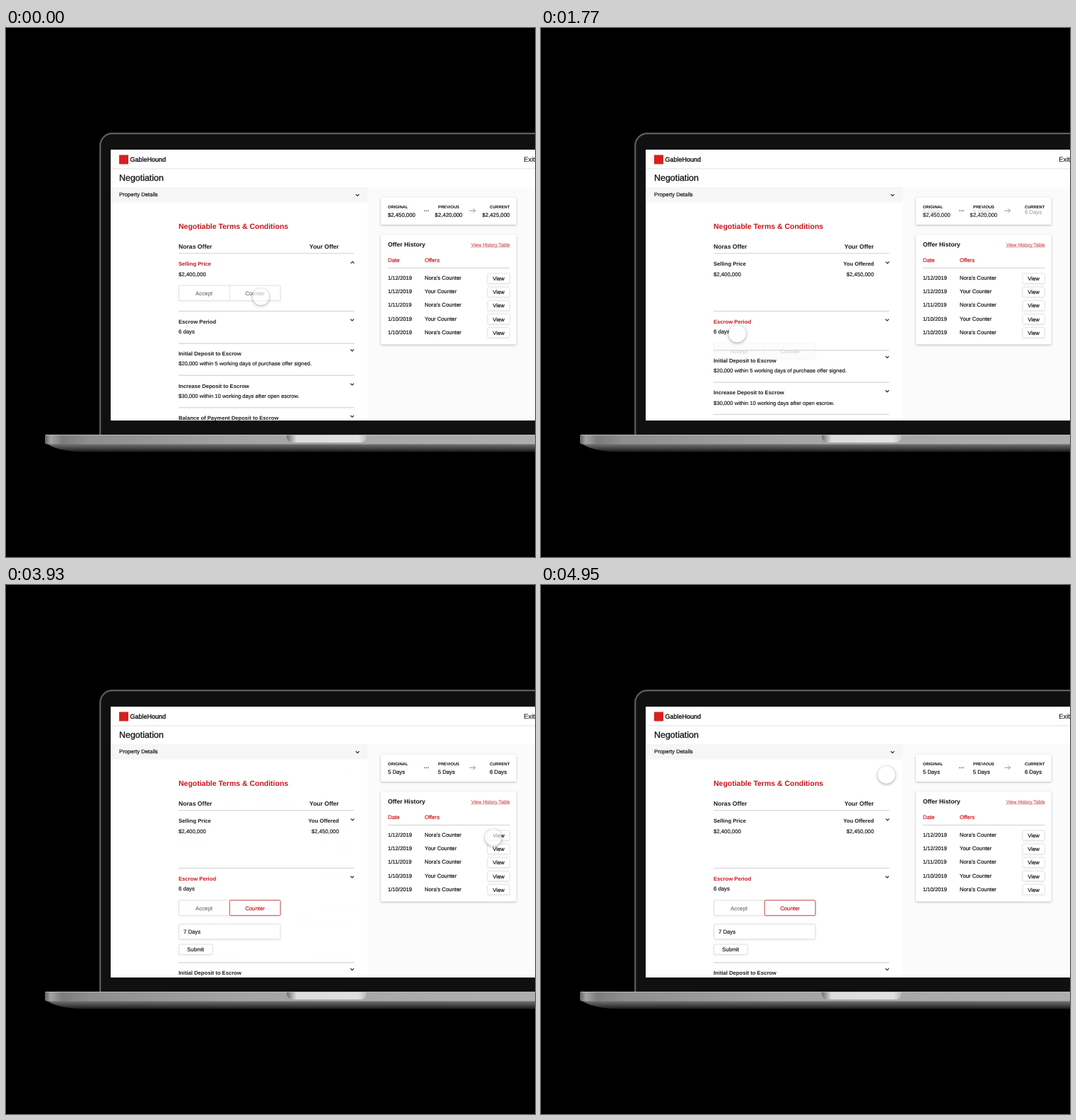
Animation of 748x748 px, one loop 4.98 s. Source, as an HTML page with a canvas:

```html
<!DOCTYPE html>
<html lang="en">
<head>
<meta charset="utf-8">
<title>Negotiation</title>
<style>
html, body { margin: 0; width: 100%; height: 100%; overflow: hidden; background: #000; }
canvas { display: block; width: 748px; height: 748px; }
</style>
</head>
<body>
<canvas id="stage"></canvas>
<script>
const SIZE = 748, LOOP = 4980;
const RED = '#c8141c', INK = '#1c1c1c', GREY = '#7a7a7a', RULE = '#dedede';
const canvas = document.getElementById('stage');
const ctx = canvas.getContext('2d');
const dpr = window.devicePixelRatio || 1;
canvas.width = canvas.height = SIZE * dpr;
ctx.scale(dpr, dpr);
ctx.textRendering = 'geometricPrecision';

const clamp = v => Math.max(0, Math.min(1, v));
const ease = (t, from, to) => {
  const u = clamp((t - from) / (to - from));
  return u * u * (3 - 2 * u);
};
const mix = (a, b, u) => a + (b - a) * u;

function fade(alpha, draw) {
  if (alpha <= 0) return;
  ctx.save();
  ctx.globalAlpha *= alpha;
  draw();
  ctx.restore();
}

// y is the middle of the capital letters; grow thickens the strokes a little
function text(s, x, y, { size = 7.65, color = INK, bold = false, align = 'left', grow = 0.18 } = {}) {
  ctx.font = `${bold ? 'bold ' : ''}${size}px "Liberation Sans", Arial, sans-serif`;
  ctx.textAlign = align;
  ctx.fillStyle = ctx.strokeStyle = color;
  ctx.fillText(s, x, y + size * 0.36);
  if (bold) return;
  ctx.lineWidth = grow;
  ctx.strokeText(s, x, y + size * 0.36);
}
const bold = (s, x, y, o) => text(s, x, y, { bold: true, ...o });

function rect(x, y, w, h, color) {
  ctx.fillStyle = color;
  ctx.fillRect(x, y, w, h);
}

function rule(y, x1 = 244, x2 = 492.5, h = 1.6, color = RULE) {
  rect(x1, y - h / 2, x2 - x1, h, color);
}

function path(points, color, width) {
  ctx.beginPath();
  points.forEach(([x, y], i) => i ? ctx.lineTo(x, y) : ctx.moveTo(x, y));
  ctx.strokeStyle = color;
  ctx.lineWidth = width;
  ctx.stroke();
}

function chevron(x, y, dir = 1) {
  path([[x - 2.4, y - 1.2 * dir], [x, y + 1.2 * dir], [x + 2.4, y - 1.2 * dir]], '#222', 1.2);
}

function box(x, y, w, h, stroke, shadow) {
  ctx.save();
  ctx.beginPath();
  ctx.roundRect(x, y, w, h, 1.5);
  ctx.fillStyle = '#fff';
  if (shadow) {
    ctx.shadowColor = `rgba(0,0,0,${shadow})`;
    ctx.shadowBlur = 3 * dpr;
    ctx.shadowOffsetY = dpr;
  }
  ctx.fill();
  ctx.shadowColor = 'transparent';
  if (stroke) {
    ctx.strokeStyle = stroke;
    ctx.lineWidth = 1;
    ctx.stroke();
  }
  ctx.restore();
}

function gradient(x1, y1, x2, y2, stops) {
  const g = ctx.createLinearGradient(x1, y1, x2, y2);
  stops.forEach(([p, c]) => g.addColorStop(p, c));
  return g;
}

function laptop() {
  rect(0, 0, SIZE, SIZE, '#000');
  ctx.save();
  ctx.beginPath();
  ctx.rect(0, 0, SIZE, 575);
  ctx.clip();
  ctx.beginPath();
  ctx.roundRect(133.2, 149.2, 700, 500, 17);
  ctx.fillStyle = '#101010';
  ctx.fill();
  ctx.strokeStyle = '#5e5e60';
  ctx.lineWidth = 2.2;
  ctx.stroke();
  ctx.restore();

  // base: underside, then the lit front edge
  ctx.beginPath();
  ctx.moveTo(55, 586);
  ctx.bezierCurveTo(66, 594, 82, 599, 108, 599.5);
  ctx.lineTo(SIZE, 599.5);
  ctx.lineTo(SIZE, 586);
  ctx.fillStyle = gradient(0, 587, 0, 600, [[0, '#7c7c7c'], [0.45, '#505050'], [1, '#141414']]);
  ctx.fill();
  ctx.beginPath();
  ctx.roundRect(55, 575, 700, 13.5, [2, 0, 0, 3]);
  ctx.fillStyle = gradient(55, 0, SIZE, 0, [[0, '#606060'], [0.012, '#a4a4a4'], [0.035, '#7c7c7c'],
    [0.09, '#8e8e8e'], [0.4, '#a4a4a4'], [1, '#aeaeae']]);
  ctx.fill();
  rect(56, 575, 692, 1, '#b8b8b8');
  ctx.beginPath();
  ctx.roundRect(397, 575.8, 112.5, 10.2, [0, 0, 8, 8]);
  ctx.fillStyle = gradient(397, 0, 509.5, 0, [[0, '#707070'], [0.12, '#dcdcdc'], [0.9, '#e0e0e0'],
    [1, '#bbb']]);
  ctx.fill();
}

function chrome() {
  rect(148, 172, 600, 383, '#fff');
  rect(511, 225, 237, 330, '#fbfbfb');
  rect(148, 225, 363, 21.5, '#f6f6f6');
  rule(199, 148, 748, 1, '#e2e2e2');
  rect(160, 179.5, 13, 13, '#d8201c');
  text('GableHound', 175.5, 186, { size: 9, color: '#111', grow: 0.35 });
  text('Exit', 732.3, 185.3, { size: 9.4 });
  text('Negotiation', 160, 211.7, { size: 12.45, color: '#111', grow: 0.3 });
  text('Property Details', 160, 235.7, { size: 7.7, color: '#111' });
  chevron(497, 236.3);
}

// heading, its x and alignment, then old and new value with the new value's x
const COLUMNS = [
  ['ORIGINAL', 540, 'left', '$2,450,000', '5 Days', 540],
  ['PREVIOUS', 626, 'center', '$2,420,000', '5 Days', 622.8],
  ['CURRENT', 712.3, 'right', '$2,425,000', '6 Days', 708]
];

function summary(t) {
  box(530, 239.5, 191.5, 38.5, null, 0.26);
  COLUMNS.forEach(([head, x, align, before, after, x2], i) => {
    const last = i === 2;
    const value = { size: 7.75, align, color: '#111' };
    const start = last ? 1690 : 1720;
    const come = ease(t, start, start + 220);
    const gone = last ? ease(t, 1590, 1740) : come;
    bold(head, x, 252.8, { size: 5.8, align, color: '#111' });
    fade(1 - gone, () => text(before, x, 264 + 3 * gone, value));
    fade(come, () => text(after, x2, 264 - 5 * (1 - come), value));
  });
  for (let i = 0; i < 3; i++) rect(591 + i * 2.7, 257.5, 1.7, 1.7, '#888');
  path([[655.5, 258.3], [663.5, 258.3]], '#888', 0.9);
  path([[660.5, 255.3], [663.6, 258.3], [660.5, 261.3]], '#888', 0.9);
}

function history() {
  box(530, 292, 191.5, 155.5, null, 0.26);
  bold('Offer History', 540, 305.5, { size: 8.67, color: '#111' });
  text('View History Table', 712.5, 306.7, { size: 6.67, color: '#cc6064', align: 'right' });
  rule(309.9, 657, 712.5, 0.6, '#cc6064');
  text('Date', 540, 328, { size: 7.8, color: RED });
  text('Offers', 592, 328, { size: 7.8, color: RED });
  rule(339.5, 540, 712.3);
  ['1/12/2019', '1/12/2019', '1/11/2019', '1/10/2019', '1/10/2019'].forEach((date, i) => {
    const y = 353.3 + i * 19.15;
    text(date, 540, y, { color: '#111' });
    text(i % 2 ? 'Your Counter' : 'Nora\u2019s Counter', 592, y, { size: 7.73, color: '#111' });
    box(681, y - 6.3, 31, 14.2, '#e4e4e4', 0.1);
    text('View', 696.5, y + 1, { align: 'center', size: 7.7, color: '#111' });
  });
}

// Accept / Counter pair with the field that opens below it
function controls(y, chosen, open, value) {
  box(244.5, y, 143.5, 21.5, '#e0e0e0', 0.08);
  rect(315.7, y, 1, 21.5, '#e0e0e0');
  text('Accept', 280, y + 11, { size: 7.8, color: GREY, align: 'center' });
  text('Counter', 352, y + 11, { size: 7.8, color: GREY, align: 'center' });
  fade(chosen, () => {
    box(316.2, y, 71.8, 21.5, '#c9444a');
    text('Counter', 352, y + 11, { size: 7.8, color: RED, align: 'center' });
  });
  fade(open, () => {
    box(244.5, y + 33.7, 143.3, 21.3, '#e0e0e0', 0.1);
    text(value, 251, y + 44.4, { size: 7.75 });
    box(244.5, y + 62.2, 47.5, 14.3, '#e0e0e0', 0.1);
    text('Submit', 268, y + 69.4, { size: 7.7, align: 'center' });
  });
}

function typed(s, t, from, step) {
  return s.slice(0, Math.max(0, Math.floor((t - from) / step)));
}

function titled(name, x, y, redness) {
  fade(1 - redness, () => bold(name, x, y));
  fade(redness, () => bold(name, x, y, { color: RED }));
}

function terms(t) {
  bold('Negotiable Terms & Conditions', 244, 280, { size: 10.48, color: RED });
  bold('Noras Offer', 244, 308.7, { size: 8.65 });
  bold('Your Offer', 470.7, 308.7, { size: 8.55, align: 'right' });
  rule(318.7, 244, 492.5, 1, '#d0d0d0');

  const done = ease(t, 1480, 1680);
  const open1 = ease(t, 180, 420) * (1 - done);
  const show = ease(t, 1690, 1930);
  const open2 = ease(t, 2320, 2570);

  titled('Selling Price', 244, 333.6, 1 - done);
  text('$2,400,000', 244, 348, { size: 7.75 });
  chevron(490, 331.6, done < 0.5 ? -1 : 1);
  fade(1 - done, () => controls(364, ease(t, 130, 280), open1, typed('$ 2,450,000', t, 760, 30)));
  fade(done, () => {
    bold('You Offered', 470.7, 333.6, { align: 'right' });
    text('$2,450,000', 470.7, 348, { size: 7.75, align: 'right' });
  });

  let y = 51.3 * open1;
  rule(400.5 + y);
  titled('Escrow Period', 244, 415 + y, done);
  text('6 days', 244, 429.7 + y, { size: 7.75 });
  chevron(489.5, 412.8 + y);
  fade(show, () =>
    controls(445.8, ease(t, 2270, 2420), open2, typed('7 Days', t, 3050, 55)));

  y += 36.5 * show + 51.3 * open2;
  rule(446 + y);
  bold('Initial Deposit to Escrow', 244, 460.4 + y);
  text('$20,000 within 5 working days of purchase offer signed.', 244, 474.7 + y, { size: 7.63 });
  chevron(489.5, 455.6 + y);
  rule(491.2 + y);
  bold('Increase Deposit to Escrow', 244, 506 + y);
  text('$30,000 within 10 working days after open escrow.', 244, 520.3 + y, { size: 7.63 });
  chevron(489.5, 503.8 + y);
  rule(536.7 + y);
  bold('Balance of Payment Deposit to Escrow', 244, 551.2 + y);
  chevron(489.5, 549 + y);
}

function pair(y, head, lines, rightHead, rightLines, lift = 0) {
  bold(head, 244, y);
  bold(rightHead, 492.3, y - lift, { align: 'right' });
  lines.forEach((s, i) => text(s, 244, y + 14.4 + i * 9.2));
  rightLines.forEach((s, i) => text(s, 492.3, y + 14.4 - lift + i * 9.2, { align: 'right' }));
}

function pastOffer() {
  rect(148, 246.5, 363, 308.5, '#fff');
  text('Nora\u2019s Counter', 244, 266.3, { size: 12.35, grow: 0.3 });
  text('1/11/2019', 244, 280.5, { size: 7.55, grow: 0.25 });
  text('Close', 497, 264.5, { size: 7.8, align: 'right' });
  bold('Negotiable Terms & Conditions', 244, 313.6, { size: 11.4 });
  bold('Your Counter', 244, 342.8, { size: 8.5 });
  bold('Nora\u2019s Counter', 492.3, 342.8, { size: 8.6, align: 'right' });
  rule(352.3, 244, 492.5, 1, '#d0d0d0');
  const first = ['$20,000 within 5 working', 'days of purchase offer', 'signed.'];
  const second = ['$30,000 within 10 working', 'days after open escrow.'];
  pair(367.4, 'Selling Price', ['$2,450,000'], 'Nora Offered', ['$2,400,000'], 3.2);
  rule(398.3);
  pair(412.7, 'Escrow Period', ['5 days'], 'Nora Offered', ['6 days']);
  rule(443.5);
  pair(458.2, 'Initial Escrow Deposit', first, 'Nora Offered', first);
  rule(508);
  pair(522.7, 'Increase Escrow Deposit', second, 'Term Accepted', second);
}

// [start, end, x, y] of each pointer move
const MOVES = [
  [330, 620, 335, 406.5],
  [1110, 1330, 277.5, 432.3],
  [1880, 2150, 360.5, 462],
  [2450, 2740, 335.5, 488],
  [3430, 3820, 689, 357],
  [4240, 4540, 488.5, 268.5]
];
const PRESSES = [100, 700, 1410, 2240, 2990, 4035, 4660];

function pointer(t) {
  let x = 360.5, y = 380;
  for (const [from, to, px, py] of MOVES) {
    const u = ease(t, from, to);
    x = mix(x, px, u);
    y = mix(y, py, u);
  }
  let press = 0;
  for (const at of PRESSES) {
    const d = Math.abs(t - at) / 200;
    if (d < 1) press = Math.max(press, 0.5 + 0.5 * Math.cos(Math.PI * d));
  }
  const r = 12 - press;

  // shadow stays outside the disc so a pressed pointer shows what is below
  ctx.save();
  ctx.beginPath();
  ctx.rect(x - 30, y - 30, 60, 60);
  ctx.arc(x, y, r, 0, 7);
  ctx.clip('evenodd');
  ctx.shadowColor = `rgba(0,0,0,${0.42 - 0.1 * press})`;
  ctx.shadowBlur = 4 * dpr;
  ctx.shadowOffsetY = dpr;
  ctx.beginPath();
  ctx.arc(x, y, r, 0, 7);
  ctx.fillStyle = '#fff';
  ctx.fill();
  ctx.restore();
  fade(1 - 0.8 * press, () => {
    ctx.beginPath();
    ctx.arc(x, y, r, 0, 7);
    ctx.fillStyle = '#fff';
    ctx.fill();
  });
}

function draw(t) {
  laptop();
  ctx.save();
  ctx.beginPath();
  ctx.rect(148, 172, 600, 383);
  ctx.clip();
  chrome();
  summary(t);
  history();
  terms(t);
  fade(ease(t, 3920, 4110) * (1 - ease(t, 4700, 4880)), pastOffer);
  pointer(t);
  ctx.restore();
}

const began = performance.now();
function tick() {
  draw((performance.now() - began) % LOOP);
  requestAnimationFrame(tick);
}
tick();
</script>
</body>
</html>
```
